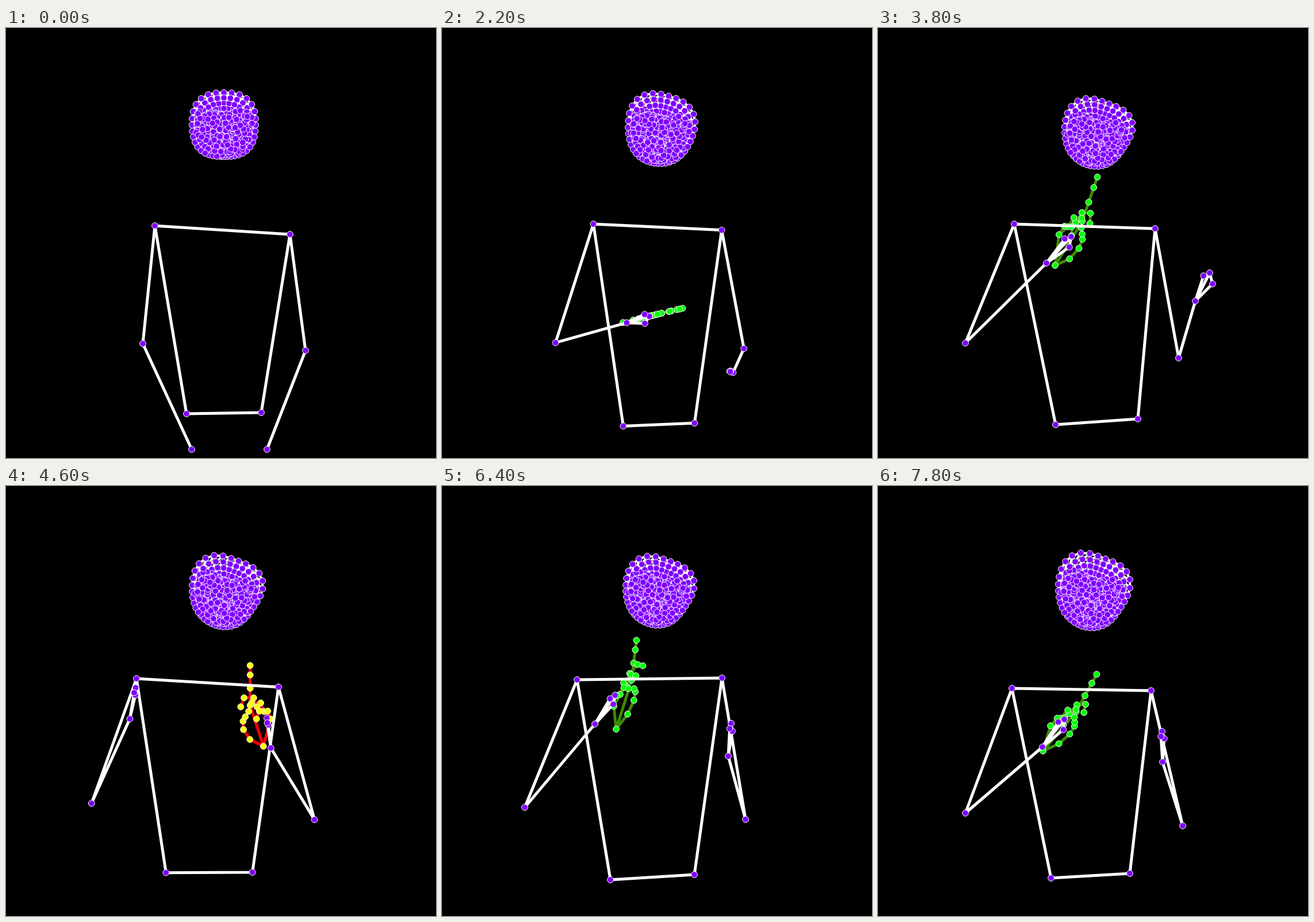
Recreate the animation shown at these times as an HTML page with a canvas. Size 748x748 px, loop 8 s.

```html
<!DOCTYPE html>
<html lang="en">
<head>
<meta charset="utf-8">
<title>Pose tracking</title>
<style>
  html, body { margin: 0; width: 100%; height: 100%; overflow: hidden; background: #000; }
  canvas { display: block; width: 100vmin; height: 100vmin; }
</style>
</head>
<body>
<canvas id="stage" width="748" height="748"></canvas>
<script>
const SIZE = 748, LOOP = 8000, STEP = 200;
const TAU = Math.PI * 2, RAD = Math.PI / 180;
const PURPLE = '#7f00ff';
const ctx = document.getElementById('stage').getContext('2d');

const mix = (a, b, k) => a + (b - a) * k;
const range = (n, f) => Array.from({ length: n }, (_, i) => f(i));
const turn = ([x, y], a) =>
  [x * Math.cos(a) - y * Math.sin(a), x * Math.sin(a) + y * Math.cos(a)];
const add = (p, q) => [p[0] + q[0], p[1] + q[1]];
const scale = (p, k) => [p[0] * k, p[1] * k];

function randomizer(seed) {
  return () => {
    seed = (seed * 16807) % 2147483647;
    return seed / 2147483647;
  };
}

// Linear motion between poses; a pose may be held over a span [from, to]
function track() {
  const keys = [];
  return {
    key(span, ...values) {
      const [from, to] = [].concat(span, span);
      keys.push({ from, to, values });
      return this;
    },
    at(time) {
      const next = keys.find(k => k.to >= time) || keys[keys.length - 1];
      const last = keys[keys.indexOf(next) - 1];
      if (!last || time >= next.from) return next.values;
      const k = (time - last.to) / (next.from - last.to);
      return last.values.map((v, i) => mix(v, next.values[i], k));
    }
  };
}

// Shoulders left and right, hips left and right
const torso = track()
  .key(0, 259, 344, 494, 359, 314, 671, 444, 669)
  .key(1400, 264, 349, 490, 355, 317, 665, 445, 665)
  .key(2800, 263, 335, 484, 349, 314, 713, 435, 704)
  .key(3800, 237, 341, 482, 349, 309, 690, 452, 680)
  .key([5000, 6000], 222, 332, 470, 350, 263, 664, 417, 668)
  .key(6400, 235, 337, 487, 334, 293, 685, 439, 676)
  .key(7800, 233, 352, 475, 356, 301, 682, 438, 674);

// Elbow, wrist, vector from wrist to index, spread in degrees
const leftArm = track()
  .key(0, 238, 549, 323, 733, 20, 45, 10)
  .key(1400, 210, 540, 323, 647, 52, 39, 21)
  .key(2800, 188, 553, 320, 412, 30, -49, 16)
  .key(3800, 152, 548, 293, 409, 43, -46, 12)
  .key([4800, 6000], 148, 553, 196, 404, 2, -56, 0)
  .key(6400, 144, 559, 266, 414, 35, -50, 8)
  .key(7800, 152, 569, 286, 454, 38, -48, 12);
const rightArm = track()
  .key(0, 521, 561, 454, 733, -20, 45, -10)
  .key(1400, 536, 541, 463, 677, -39, 35, -25)
  .key(2800, 517, 570, 539, 541, 19, -30, 40)
  .key(3400, 521, 573, 582, 500, 38, -45, 20)
  .key(3800, 523, 574, 552, 475, 25, -49, 18)
  .key([4800, 6000], 540, 582, 438, 451, -15, -53, -3)
  .key(6400, 528, 580, 498, 470, 5, -57, 4)
  .key(7200, 529, 586, 540, 488, 28, -44, 6)
  .key(7800, 530, 591, 495, 480, -1, -53, 5);

// Offset from the wrist, sideways axis, lengthwise axis, finger curl
const hand = track()
  .key(1400, -10, -21, 70, -60, 43, 58, 0)
  .key(2800, -4, 15, 45, 22, 37, -60, .3)
  .key([3800, 4400], 15, 4, 58, 5, 25, -73, 1)
  .key([4600, 6000], -13, -3, -66, 0, 0, -66, 1)
  .key([6200, 6400], 37, 9, 52, -40, 8, -66, .8)
  .key(7800, 1, 7, 60, -4, 34, -62, 1);

// Head centre, radii, tilt
const head = track()
  .key(0, 379, 170, 57.5, 58, 0)
  .key(1400, 379, 171.5, 57, 61, .15)
  .key(2800, 384, 179.5, 60, 61.5, 1)
  .key(3800, 383.5, 182.5, 58.5, 58, 1)
  .key(5400, 386.5, 185, 63.5, 64, 1)
  .key(6400, 379, 183, 59, 59, 1)
  .key(7800, 376, 182.5, 62, 64, 1);

const visible = p => p[1] < SIZE;

function strokeLinks(links, color, width) {
  ctx.strokeStyle = color;
  ctx.lineWidth = width;
  ctx.beginPath();
  for (const [a, b] of links) {
    if (!visible(a) || !visible(b)) continue;
    ctx.moveTo(...a);
    ctx.lineTo(...b);
  }
  ctx.stroke();
}

function drawDots(points, fill) {
  ctx.fillStyle = fill;
  ctx.strokeStyle = '#fff';
  ctx.lineWidth = 1;
  for (const p of points.filter(visible)) {
    ctx.beginPath();
    ctx.arc(p[0], p[1], 5.4, 0, TAU);
    ctx.fill();
    ctx.stroke();
  }
}

// Walks along bones; angles are measured from the lengthwise axis
function chain(start, count, bone) {
  const points = [start];
  for (let j = 0; j < count; j++) {
    const [angle, length] = bone(j);
    points.push(add(points[j],
      [Math.sin(angle * RAD) * length, Math.cos(angle * RAD) * length]));
  }
  return points;
}

function finger(i, curl) {
  const bend = i ? curl : 0;
  const size = 1 - i * .06;
  return chain([.35 - .18 * i, 1.08 - .04 * i * i], 3, j =>
    [bend * (20 + 70 * j), mix(.45 - .1 * j, .27, bend) * size]);
}

function drawHand(time) {
  if (time < 1000) return;
  const pointing = time > 4400 && time < 6200;
  const [dx, dy, ax, ay, bx, by, curl] = hand.at(time);
  const [, , wx, wy] = (pointing ? rightArm : leftArm).at(time);
  const place = ([u, v]) => [wx + dx + u * ax + v * bx, wy + dy + u * ay + v * by];

  const thumb = chain([0, 0], 4, j => [63 - 30 * j, .4 - .09 * j]).map(place);
  const fingers = range(4, i => finger(i, curl).map(place));
  const palm = [thumb[0], ...fingers.map(f => f[0]), thumb[0]];
  const links = [palm, thumb, ...fingers]
    .flatMap(line => line.slice(1).map((p, i) => [line[i], p]));
  strokeLinks(links, pointing ? '#f00' : '#3d8a00', 5);
  drawDots([...thumb, ...fingers.flat()], pointing ? '#ff0' : '#0f0');
}

function drawBody(time) {
  const [lx, ly, rx, ry, hlx, hly, hrx, hry] = torso.at(time);
  const shoulders = [[lx, ly], [rx, ry]], hips = [[hlx, hly], [hrx, hry]];
  const links = [shoulders, hips], dots = [...shoulders, ...hips];
  [leftArm, rightArm].forEach((arm, i) => {
    const [ex, ey, wx, wy, ix, iy, spread] = arm.at(time);
    const elbow = [ex, ey], wrist = [wx, wy], reach = [ix, iy];
    const index = add(wrist, reach);
    const pinky = add(wrist, scale(turn(reach, spread * RAD), .77));
    const thumb = add(wrist, scale(turn(reach, -spread * .5 * RAD), .84));
    links.push([shoulders[i], hips[i]], [shoulders[i], elbow], [elbow, wrist],
      [wrist, index], [wrist, pinky], [wrist, thumb], [pinky, index]);
    dots.push(elbow, wrist, pinky, index, thumb);
  });
  strokeLinks(links, '#fff', 5);
  drawDots(dots, PURPLE);
}

// Distance from the head centre to its rim
function rim(angle, tilt) {
  const wave = (n, deg) => Math.cos(n * (angle - deg * RAD));
  const straight = 1 - .035 * Math.sin(angle) - .04 * wave(4, 0);
  const tilted = 1 + .063 * (wave(1, 215) - wave(3, 45)) + .03 * wave(4, 154);
  return mix(straight, tilted, tilt);
}

const random = randomizer(41);
const RIM_POINTS = 36;

// Eyes, nose and mouth as nested ovals in head units
const FEATURES = [
  { x: -.47, y: -.27, rx: .34, ry: .19, n: 16 },
  { x: .48, y: -.25, rx: .34, ry: .19, n: 16 },
  { x: .04, y: .1, rx: .22, ry: .2, n: 12 },
  { x: 0, y: .5, rx: .4, ry: .22, n: 20 }
].flatMap(({ x, y, rx, ry, n }) => [1, .68, .4].map(s => range(n, i => [
  x + Math.cos(i / n * TAU) * rx * s + (random() - .5) * .06,
  y + Math.sin(i / n * TAU) * ry * s + (random() - .5) * .06
])));

const SKIN = range(150, () => {
  const r = Math.sqrt(random()) * .93, a = random() * TAU;
  return [r * Math.cos(a), r * Math.sin(a)];
}).filter(p => p[1] > -.4);

const ORDER = range(600, () => random());

function drawHead(time) {
  const [cx, cy, rx, ry, tilt] = head.at(time);
  const place = ([u, v]) => [cx + u * rx, cy + v * ry];
  const inside = p => place(add(turn(p, tilt * .22), [-.07 * tilt, .03 * tilt]));

  // Points lie further apart across the forehead
  const rings = [1, .84, .68, .52, .36].map(s => range(RIM_POINTS, i => {
    const a = i / RIM_POINTS * TAU;
    const angle = a + .35 * Math.cos(a) + tilt * .35;
    const r = rim(angle, tilt) * s;
    const drift = (1 - s) * tilt;
    return place([Math.cos(angle) * r - .07 * drift, Math.sin(angle) * r + .05 * drift]);
  }));
  const links = [];
  rings.forEach((ring, k) => ring.forEach((p, i) => {
    const j = (i + 1) % RIM_POINTS;
    links.push([p, ring[j]]);
    if (k) links.push([p, rings[k - 1][i]], [p, rings[k - 1][j]]);
  }));
  const ovals = FEATURES.map(oval => oval.map(inside));
  for (const oval of ovals)
    oval.forEach((p, i) => links.push([p, oval[(i + 1) % oval.length]]));

  const dots = [...rings.flat(), ...ovals.flat(), ...SKIN.map(inside)]
    .map((p, i) => ({ p, order: ORDER[i] }))
    .sort((a, b) => a.order - b.order)
    .map(d => d.p);
  strokeLinks(links, '#fff', 4);
  drawDots(dots, PURPLE);
}

function draw(elapsed) {
  const time = Math.floor(elapsed % LOOP / STEP) * STEP;
  ctx.fillStyle = '#000';
  ctx.fillRect(0, 0, SIZE, SIZE);
  drawHand(time);
  drawBody(time);
  drawHead(time);
}

const start = performance.now();
function tick() {
  draw(performance.now() - start);
  requestAnimationFrame(tick);
}
tick();
</script>
</body>
</html>
```
